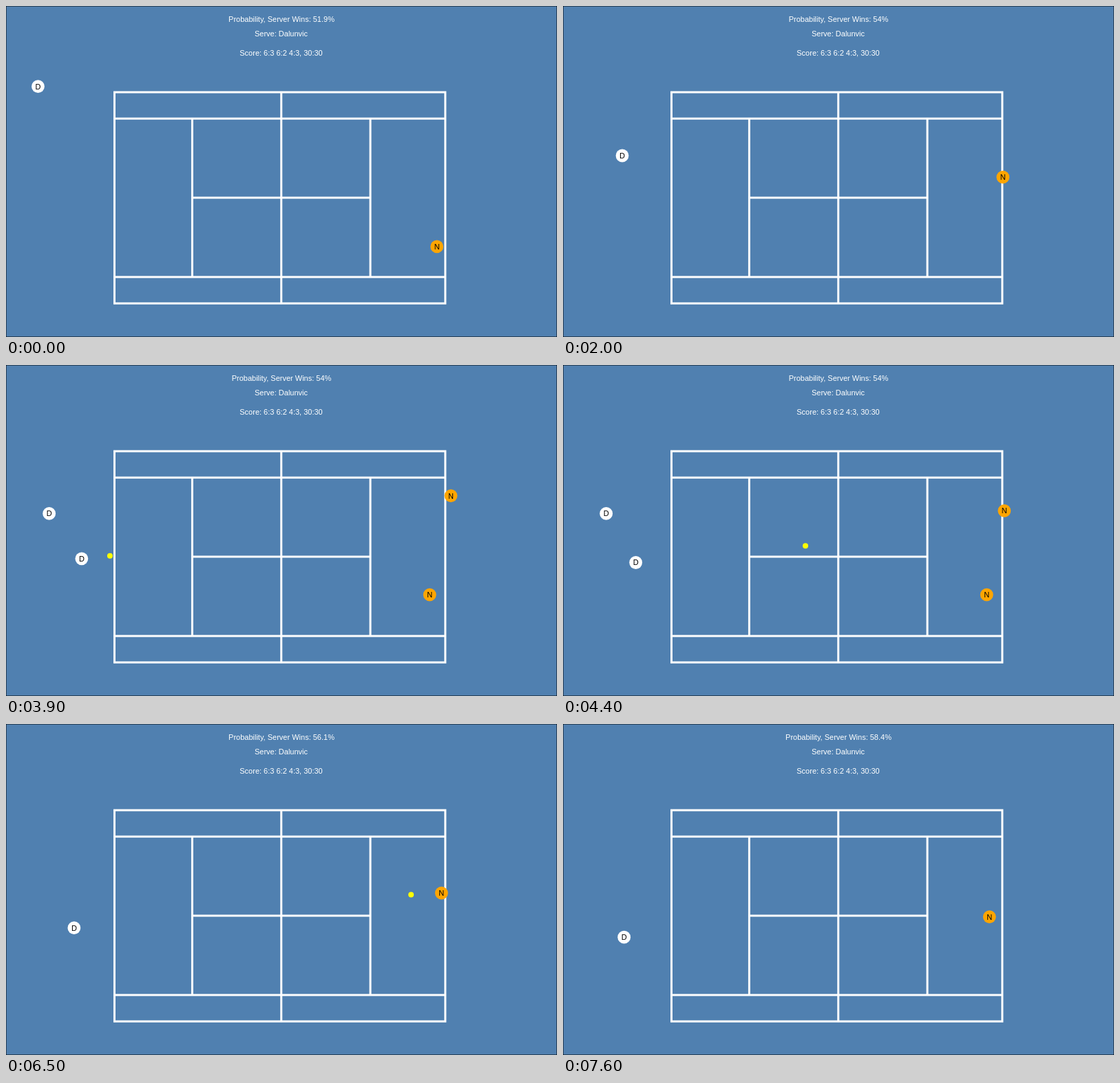
These frames come from a looping animation (800 px wide and 480 px high, 8000 ms). An HTML page with a canvas:

```html
<!DOCTYPE html>
<html lang="en">
<head>
<meta charset="utf-8">
<title>Tennis rally</title>
<style>
  html, body { margin: 0; width: 100%; height: 100%; overflow: hidden; background: #5080b0; }
  canvas { display: block; }
</style>
</head>
<body>
<canvas id="stage" width="800" height="480"></canvas>
<script>
const ctx = document.getElementById('stage').getContext('2d');
const LOOP = 8000, STEP = 100;

// Resting poses; `ball` is the player holding the ball
const poses = [
  { D: [46.5, 116.7], N: [625.6, 348.9], ball: 'D', odds: '51.9%' },
  { D: [110.7, 279.7], N: [647, 185.2], ball: 'D', odds: '54%' },
  { D: [99.8, 294.4], N: [633.5, 242], ball: 'N', odds: '56.1%' },
  { D: [88.7, 309.2], N: [619.2, 279.6], ball: 'D', odds: '58.4%' }
];
const moves = [[1200, 2500], [3800, 5100], [6400, 7600]];
const extras = { D: [62.7, 215.4], N: [615.2, 333.2], from: 2500, to: 5100 };
const colors = { D: '#fff', N: '#ffa500' };

const mix = (a, b, k) => a.map((v, i) => v + (b[i] - v) * k);

function dot([x, y], r, color) {
  ctx.fillStyle = color;
  ctx.beginPath();
  ctx.arc(x, y, r, 0, Math.PI * 2);
  ctx.fill();
}

function label(text, x, y, color) {
  ctx.fillStyle = color;
  ctx.fillText(text, x, y);
}

function player(name, pos) {
  dot(pos, 9.4, colors[name]);
  label(name, pos[0], pos[1] + 4, '#000');
}

function line(x1, y1, x2, y2) {
  ctx.moveTo(x1, y1);
  ctx.lineTo(x2, y2);
}

function court() {
  ctx.fillStyle = '#5080b0';
  ctx.fillRect(0, 0, 800, 480);
  ctx.strokeStyle = '#000';
  ctx.lineWidth = 1;
  ctx.strokeRect(0, 0, 800, 480);

  ctx.strokeStyle = '#fff';
  ctx.lineWidth = 3;
  ctx.beginPath();
  ctx.rect(157.5, 125, 480.3, 306.2);
  for (const y of [163.2, 392.9]) line(156.5, y, 639, y);
  for (const x of [270.4, 529]) line(x, 163, x, 393.5);
  line(270.4, 278, 529, 278);
  line(399.7, 124, 399.7, 432);
  ctx.stroke();
}

function draw(now) {
  const t = Math.floor((now % LOOP) / STEP) * STEP;
  let i = 0;
  while (i < moves.length - 1 && t >= moves[i][1]) i++;
  const [start, end] = moves[i];
  const k = Math.min(1, Math.max(0, (t - start) / (end - start)));
  const a = poses[i], b = poses[i + 1];

  court();
  ctx.font = '11px "Liberation Sans", Arial, sans-serif';
  ctx.textAlign = 'center';
  label('Probability, Server Wins: ' + (k > 0.5 ? b : a).odds, 400, 23, '#fff');
  label('Serve: Dalunvic', 399.5, 44, '#fff');
  label('Score: 6:3 6:2 4:3, 30:30', 399.5, 72, '#fff');

  dot(mix(a[a.ball], b[b.ball], k), 4, '#ff0');
  for (const name of ['D', 'N']) {
    if (t >= extras.from && t < extras.to) player(name, extras[name]);
    player(name, mix(a[name], b[name], k));
  }
}

function tick() {
  draw(performance.now());
  requestAnimationFrame(tick);
}
tick();
</script>
</body>
</html>
```
